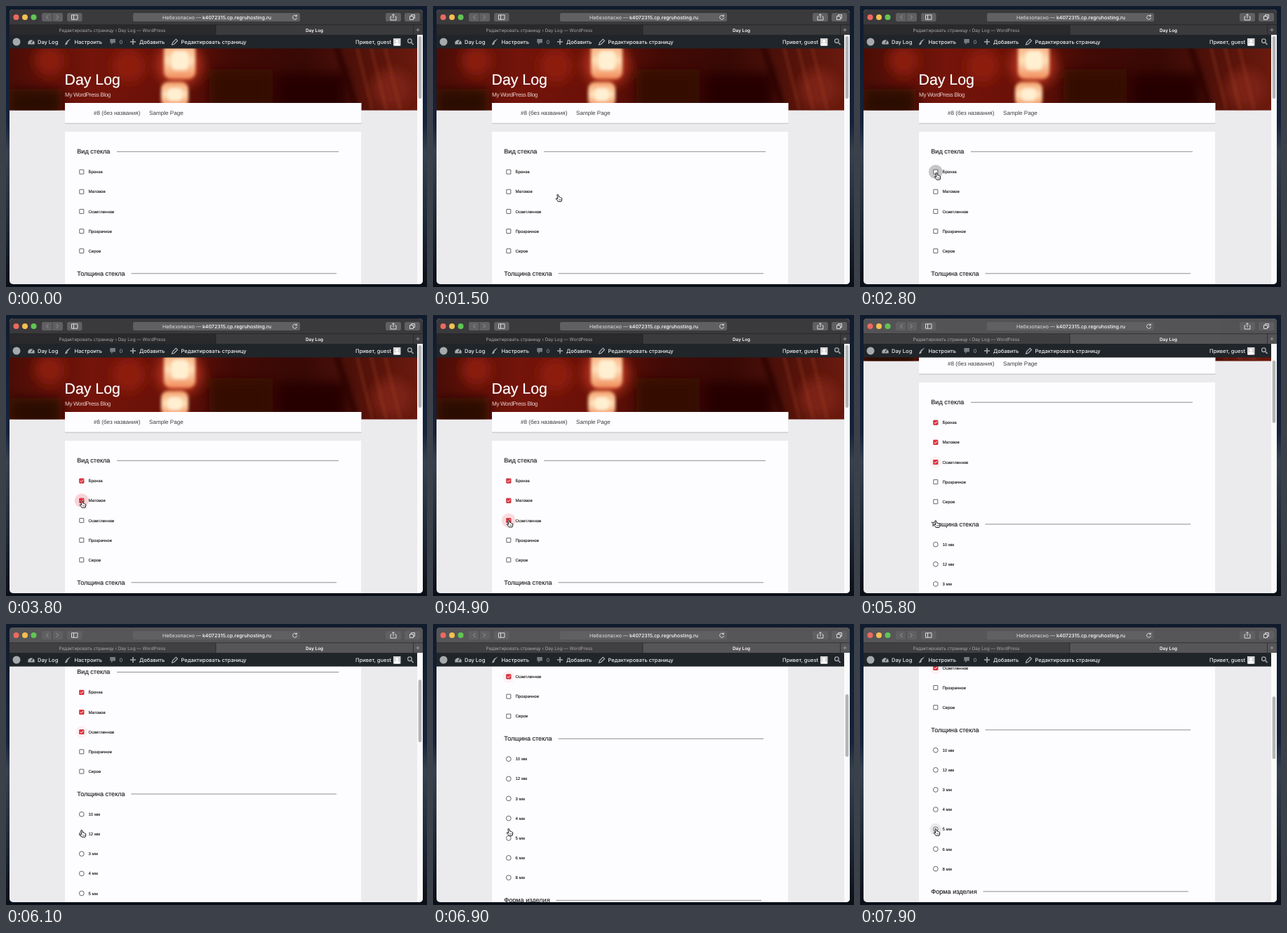
These frames come from a looping animation (600 px wide and 400 px high, 8 s). An HTML page:

```html
<!DOCTYPE html>
<html lang="ru">
<head>
<meta charset="utf-8">
<title>Day Log</title>
<style>
html, body { margin: 0; width: 100%; height: 100%; overflow: hidden; background: #0e1726; }
svg { display: block; width: 600px; height: 400px; font-family: "Liberation Sans", Arial, sans-serif; text-rendering: geometricPrecision; }
#chrome { font-family: Inter, sans-serif; }
.bar { font-size: 7.5px; font-weight: 500; fill: #f0f0f1; }
.nav { font-size: 8.15px; fill: #3c3c3e; }
.head { font-size: 9.1px; fill: #1c1c1e; stroke: #1c1c1e; stroke-width: .15; }
.item { font-size: 6.05px; fill: #111; stroke: #111; stroke-width: .1; }
.line { fill: none; stroke: #ddd; stroke-width: 1; }
.box { fill: #fff; stroke: #333; stroke-width: .75; }
</style>
</head>
<body>
<svg viewBox="0 0 600 400">
  <defs>
    <linearGradient id="desk" x2="0" y2="1">
      <stop offset="0" stop-color="#101b2d"/><stop offset=".42" stop-color="#16233a"/>
      <stop offset=".52" stop-color="#354050"/><stop offset=".75" stop-color="#202a38"/>
      <stop offset="1" stop-color="#0a0f18"/>
    </linearGradient>
    <linearGradient id="hero">
      <stop offset="0" stop-color="#4a0d06"/><stop offset=".2" stop-color="#74140a"/>
      <stop offset=".38" stop-color="#6a1108"/><stop offset=".55" stop-color="#430a05"/>
      <stop offset=".72" stop-color="#380905"/><stop offset="1" stop-color="#6a1a0e"/>
    </linearGradient>
    <linearGradient id="lamp" x2="0" y2="1">
      <stop offset="0" stop-color="#f5a06c"/><stop offset=".5" stop-color="#ffe0b8"/>
      <stop offset="1" stop-color="#f08a58"/>
    </linearGradient>
    <filter id="soft" x="-50%" y="-50%" width="200%" height="200%"><feGaussianBlur stdDeviation="2"/></filter>
    <filter id="haze" x="-50%" y="-50%" width="200%" height="200%"><feGaussianBlur stdDeviation="8"/></filter>
    <filter id="shade"><feDropShadow dx="0" dy=".8" stdDeviation=".7" flood-opacity=".3"/></filter>
    <clipPath id="window"><rect x="5" y="5" width="589" height="391" rx="5"/></clipPath>
    <clipPath id="view"><rect x="5" y="60" width="581" height="336"/></clipPath>
    <clipPath id="photo"><rect x="5" y="60" width="581" height="88.5"/></clipPath>
  </defs>
  <rect width="600" height="400" fill="url(#desk)"/>
  <g clip-path="url(#window)">
    <rect x="5" y="5" width="589" height="391" fill="#ebeaec"/>
    <g clip-path="url(#view)"><g id="page"></g></g>
    <rect x="586" y="41" width="8" height="355" fill="#fafafa"/>
    <rect id="thumb" x="587.7" y="43" width="4.6" height="89" rx="2.3" fill="#b5b5b7"/>
    <g id="chrome"></g>
  </g>
  <g id="hand" stroke="#111" stroke-width=".95" stroke-linejoin="round" fill="#fff">
    <path d="M-2.2-4.3Q-1.2-5.3-.4-4.2L.6-.9Q1.5-1.6 2.1-.5Q3-.9 3.5.1Q4.6-.2 4.7 1.1L4.7 2.9Q4.6 4 3.9 5.3H-.8Q-1.8 3.6-3.6 1.8Q-4.1.8-3.1.7L-1.2 1.6Z"/>
    <path d="M.7 1.8V3.7M2 1.8V3.7M3.2 1.8V3.7" stroke-width=".5"/>
  </g>
</svg>
<script>
const byId = id => document.getElementById(id);
const rect = (x, y, w, h, fill, more = '') =>
  `<rect x="${x}" y="${y}" width="${w}" height="${h}" fill="${fill}" ${more}/>`;
const circle = (x, y, r, fill, more = '') => `<circle cx="${x}" cy="${y}" r="${r}" fill="${fill}" ${more}/>`;
const text = (x, y, words, more) => `<text x="${x}" y="${y}" ${more}>${words}</text>`;
const path = (d, more = 'class="line"') => `<path d="${d}" ${more}/>`;

const STEP = 28.15;
const sections = [
  { y: 207, title: 'Вид стекла', from: 158, to: 474, items: ['Бронза', 'Матовое', 'Осветленное', 'Прозрачное', 'Серое'] },
  { y: 380.5, title: 'Толщина стекла', from: 178.5, to: 471, items: ['10 мм', '12 мм', '3 мм', '4 мм', '5 мм', '6 мм', '8 мм'], radio: true },
  { y: 610.5, title: 'Форма изделия', from: 175.5, to: 468, items: [] }
];
const clicks = [2900, 3800, 4700];

function heroPhoto() {
  const lantern = rect(225, 52, 45, 52, 'url(#lamp)', 'rx="10"') + rect(221, 108, 39, 36, 'url(#lamp)', 'rx="10"') +
    rect(236, 64, 24, 27, '#fff0d2', 'rx="6"') + rect(230, 117, 21, 18, '#fff0d2', 'rx="6"');
  const beams = [500, 520, 540].map(x => path(`M${x} 58L${x + 22} 148`, 'stroke="#a5482a" stroke-width="3" opacity=".45"')).join('');
  return `<g clip-path="url(#photo)">${rect(5, 60, 581, 89, 'url(#hero)')}
    <g filter="url(#haze)">${circle(247, 83, 32, '#b4301a')}${circle(175, 85, 24, '#8e1e0e')}
      ${circle(62, 78, 22, '#8a1c0d')}${rect(5, 118, 75, 40, '#2a0704')}${rect(290, 90, 90, 60, '#340804')}
      ${rect(385, 95, 100, 60, '#260604')}${circle(550, 118, 28, '#7c2413')}</g>
    <g filter="url(#soft)">${lantern}${beams}
      ${path('M470 55L500 148', 'stroke="#240503" stroke-width="9" opacity=".6"')}</g></g>`;
}

function itemMarkup(section, label, i) {
  const y = section.y + 29.1 + i * STEP;
  const key = (section.radio ? 'r' : 'c') + i;
  const control = section.radio
    ? circle(107.8, y, 3.4, '#fff', 'class="box"')
    : rect(104.8, y - 3, 6, 6, '#fff', 'class="box" rx=".3"') +
      `<g id="${key}-on">${rect(104.4, y - 3.4, 6.8, 6.8, '#e5303d', 'rx=".8"')}
        ${path(`M105.8 ${y}l1.4 1.5 2.8-3`, 'fill="none" stroke="#fff" stroke-width="1"')}</g>`;
  return circle(107.8, y, 10, '#000', `id="${key}-halo" opacity="0"`) + control + text(117.5, y + 2.2, label, 'class="item"');
}

byId('page').innerHTML = heroPhoto() +
  text(83.5, 112, 'Day Log', 'font-size="21.3" fill="#fff" stroke="#fff" stroke-width=".2"') +
  text(84, 128.5, 'My WordPress Blog', 'font-size="8.2" letter-spacing="-.43" fill="#e6cfcb"') +
  `<g filter="url(#shade)">${rect(84, 138, 422.5, 28.5, '#fdfcfe')}${rect(84, 179, 422.5, 700, '#fdfcfe')}</g>` +
  text(125, 154.5, '#8 (без названия)', 'class="nav"') + text(204, 154.5, 'Sample Page', 'class="nav"') +
  sections.map(s => text(101.3, s.y + 3.2, s.title, 'class="head"') +
    path(`M${s.from} ${s.y + .3}H${s.to}`, 'stroke="#838286" stroke-width=".9"') +
    s.items.map((label, i) => itemMarkup(s, label, i)).join('')).join('');

const button = (x, w) => rect(x, 10, w, 12, '#606063', 'rx="2.5"');
const icon = d => path(d, 'fill="none" stroke="#a7aaad" stroke-width="1.6"');
byId('chrome').innerHTML =
  rect(5, 5, 589, 22, '#3a393c') + rect(5, 27, 294, 14, '#2a292b') + rect(299, 27, 295, 14, '#3b3a3d') +
  `<g id="tint">${rect(5, 5, 589, 22, '#565558')}${rect(5, 27, 294, 14, '#403f42')}${rect(299, 27, 295, 14, '#565558')}</g>` +
  path('M5 26.7H594M299 27V41M580.5 27V41', 'stroke="#1d1c1e" stroke-width=".6" fill="none"') +
  ['#ec6a5e', '#f4bf4f', '#61c554'].map((c, i) => circle(14.5 + i * 12.5, 16, 4, c)).join('') +
  button(51, 30) + button(87, 21.5) + button(181, 238) + button(541, 22) + button(568, 22) +
  path('M66 10V22', 'stroke="#444"') +
  path('M60.5 13l-3 3 3 3M71.5 13l3 3-3 3', 'fill="none" stroke="#97979a" stroke-width="1"') +
  path('M93.5 12.8h8.5v6.4h-8.5zM96.5 12.8v6.4M549.5 15h-1.5v5h8v-5h-1.5M552 17.5v-6l-1.8 1.8M552 11.5l1.8 1.8M575.5 14.5h5v5h-5zM577.5 14.5v-2h5v5h-2') +
  path('M414 14.3a3 3 0 1 0 .6 2.4M414.4 12.5v2.2h-2.2') +
  text(300.5, 18.7, 'Небезопасно — <tspan font-weight="500" fill="#fff">k4072315.cp.regruhosting.ru</tspan>',
    'font-size="7.1" fill="#e4e4e5" text-anchor="middle"') +
  text(151.5, 36.5, 'Редактировать страницу ‹ Day Log — WordPress', 'font-size="6.4" fill="#a9a9ab" text-anchor="middle"') +
  text(439.5, 36.5, 'Day Log', 'font-size="6.4" font-weight="600" fill="#fff" text-anchor="middle"') +
  path('M587 31.5v5M584.5 34h5', 'stroke="#aaa" stroke-width=".8"') +
  rect(5, 41, 581, 19.5, '#20252a') + circle(15, 51, 5.5, '#a7aaad') +
  path('M31.3 54.5a4.9 4.9 0 1 1 9.4 0z', 'fill="#a7aaad"') + path('M36 53l2.3-4', 'stroke="#20252a" stroke-width="1.2"') +
  path('M92.5 46.3l-4.8 5.5-1.6-1.5zM86.8 51l1.2 1.4q-1 3.2-4.5 2.9 1.4-1 1.3-2.4.5-1.7 2-1.9z', 'fill="#a7aaad"') +
  path('M148.3 47h7.6v5.6h-3.5l-2.3 2.7v-2.7h-1.8z', 'fill="#777c81"') +
  icon('M181 47v8M177 51h8') +
  path('M236.5 55.2l1-3.2 4.8-4.8 2.2 2.2-4.8 4.8z', 'fill="none" stroke="#b9bbbd" stroke-width="1.1"') +
  icon('M577.8 52.2l2.8 2.8') + circle(575.4, 49.7, 2.8, 'none', 'stroke="#a7aaad" stroke-width="1.3"') +
  rect(552, 46, 10.5, 10.5, '#d5d5d5') + circle(557.2, 50, 2.1, '#fff') + path('M553 56.5q0-4 4.2-4t4.2 4z', 'fill="#fff"') +
  [[45, 'Day Log'], [97.5, 'Настроить'], [190, 'Добавить'], [249.5, 'Редактировать страницу']]
    .map(([x, s]) => text(x, 54, s, 'class="bar"')).join('') +
  text(161.5, 54, '0', 'class="bar" style="fill:#8b8f93"') +
  text(549, 54, 'Привет, guest', 'class="bar" text-anchor="end"');

const pointer = [[900, 262, 410], [1500, 179, 273], [2500, 110, 242], [3200, 110, 242], [3600, 109, 269],
  [4100, 109, 269], [4550, 109, 297], [5400, 109, 296], [6100, 109, 298], [7000, 109, 296]];

function pointerAt(t) {
  const next = pointer.findIndex(p => p[0] > t);
  if (next < 0) return pointer.at(-1).slice(1);
  if (!next) return [-50, -50];
  const [a, b] = [pointer[next - 1], pointer[next]];
  const u = (t - a[0]) / (b[0] - a[0]), k = u * u * (3 - 2 * u);
  return [a[1] + (b[1] - a[1]) * k, a[2] + (b[2] - a[2]) * k];
}

// Steady swipe followed by momentum that dies away.
function scrollAt(t) {
  if (t < 5400) return 0;
  if (t < 5500) return (t - 5400) * .27;
  if (t < 6100) return 27 + (t - 5500) * .186;
  return 138.6 + 91.4 * (1 - Math.exp(-(Math.min(t, 7400) - 6100) / 500)) / (1 - Math.exp(-2.6));
}

function halo(key, color, opacity, r) {
  const el = byId(key + '-halo');
  el.setAttribute('fill', color);
  el.setAttribute('opacity', opacity);
  el.setAttribute('r', r);
}

function draw(t) {
  const scroll = scrollAt(t);
  byId('page').setAttribute('transform', `translate(0 ${-scroll})`);
  byId('thumb').setAttribute('y', 43 + scroll * .262);
  byId('tint').setAttribute('opacity', Math.min(1, scroll / 88));
  byId('hand').setAttribute('transform', `translate(${pointerAt(t)})`);
  for (let i = 0; i < 5; i++) {
    const since = t - clicks[i];
    byId(`c${i}-on`).setAttribute('visibility', since >= 0 ? 'visible' : 'hidden');
    const focused = since >= 0 && !(t >= clicks[i + 1] - 150);
    if (focused) halo(`c${i}`, '#e5303d', Math.max(.06, .2 - Math.max(0, since - 100) / 2500), since < 500 ? 10 : 8.5);
    else if (since > -150 && since < 0) halo(`c${i}`, '#222', .25, 10);
    else halo(`c${i}`, '#222', 0, 10);
  }
  halo('r4', '#222', Math.min(.09, Math.max(0, (t - 7000) / 3000)), 8.5);
}

function tick(now) {
  draw(now % 8000);
  requestAnimationFrame(tick);
}
draw(0);
requestAnimationFrame(tick);
</script>
</body>
</html>
```
